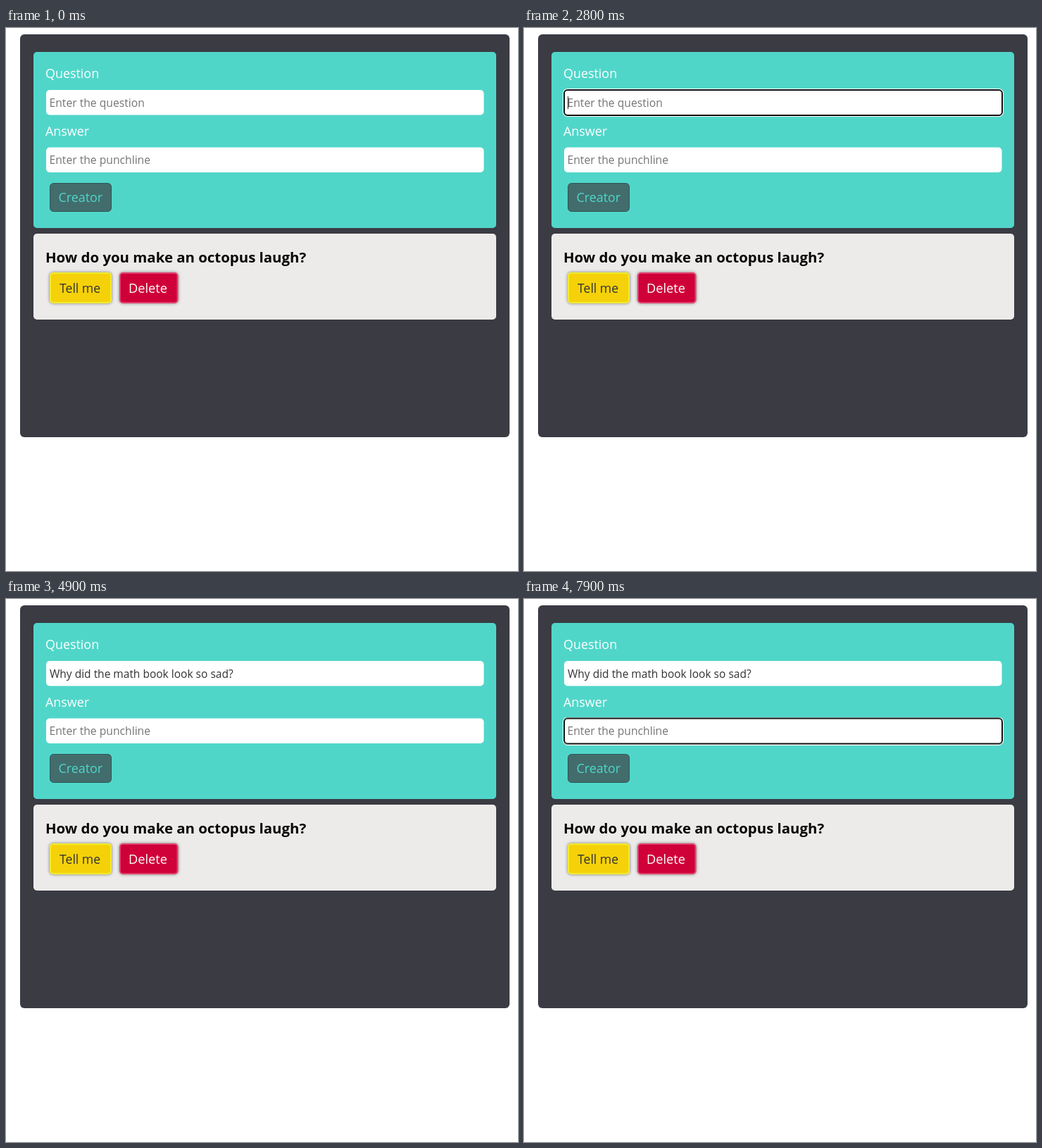
An HTML page for the animation above (8 s loop, 727 by 771 pixels).

```html
<!DOCTYPE html>
<html lang="en">
<head>
<meta charset="utf-8">
<title>Joke form</title>
<style>
  html, body { margin: 0; width: 100%; height: 100%; overflow: hidden; background: #fff; }
  svg { display: block; width: 727px; height: 771px; }
  text { font-family: "Open Sans", "Noto Sans", sans-serif; font-size: 17.9px; fill: #fff; }
  .hint { font-size: 15.7px; fill: #757575; }
  .typed { font-size: 15.5px; fill: #333; }
  .title { font-size: 20.4px; font-weight: 700; fill: #060606; }
  .caret { fill: #222; }
  .raised { filter: drop-shadow(0 0 2px rgba(40, 40, 30, .6)); }

  /* Every state is a hard switch on one 8 s clock. */
  .focus-q, .focus-a, .empty-q, .full-q, .caret-start, .caret-end, .caret-a {
    animation: 8s step-end infinite;
  }
  .focus-q { animation-name: focus-q; }
  .focus-a { animation-name: focus-a; }
  .empty-q { animation-name: empty-q; }
  .full-q { animation-name: full-q; }
  .caret-start { animation-name: caret-start; }
  .caret-end { animation-name: caret-end; }
  .caret-a { animation-name: caret-a; }

  @keyframes focus-q { 0%, 57.5% { opacity: 0 } 33.75% { opacity: 1 } }
  @keyframes focus-a { 0% { opacity: 0 } 88.75%, 100% { opacity: 1 } }
  @keyframes empty-q { 0% { opacity: 1 } 45%, 100% { opacity: 0 } }
  @keyframes full-q { 0% { opacity: 0 } 45%, 100% { opacity: 1 } }
  @keyframes caret-start { 0%, 40%, 100% { opacity: 0 } 33.75% { opacity: 1 } }
  @keyframes caret-end { 0%, 57.5%, 100% { opacity: 0 } 52.5% { opacity: 1 } }
  @keyframes caret-a { 0%, 93.75%, 100% { opacity: 0 } 88.75% { opacity: 1 } }
</style>
</head>
<body>
<svg viewBox="0 0 727 771">
  <defs>
    <g id="ring">
      <rect x="55" y="86" width="626" height="40" rx="7" fill="#fff"/>
      <rect x="57" y="88" width="622" height="36" rx="5" fill="#fff" stroke="#101010" stroke-width="2"/>
    </g>
  </defs>

  <rect x="20" y="9" width="695" height="572" rx="6" fill="#3a3b43"/>

  <!-- Form -->
  <rect x="39" y="34" width="657" height="250" rx="5" fill="#50d6c9"/>
  <text x="56" y="71">Question</text>
  <text x="56" y="152.5">Answer</text>

  <rect x="57" y="88" width="621.5" height="35.5" rx="5" fill="#fff"/>
  <use href="#ring" class="focus-q"/>
  <text class="hint empty-q" x="61.5" y="111.5">Enter the question</text>
  <text class="typed full-q" x="62" y="111.5">Why did the math book look so sad?</text>
  <rect class="caret caret-start" x="62" y="97" width="1" height="18"/>
  <rect class="caret caret-end" x="321.5" y="97" width="1" height="18"/>

  <rect x="57" y="169.5" width="621.5" height="35.5" rx="5" fill="#fff"/>
  <use href="#ring" class="focus-a" y="81.5"/>
  <text class="hint" x="61.5" y="192.5">Enter the punchline</text>
  <rect class="caret caret-a" x="62" y="178" width="1" height="18"/>

  <rect x="62.5" y="220.5" width="87" height="40" rx="5" fill="#426d6c" stroke="#2f5558"/>
  <text x="74.5" y="247" style="fill:#50d6c9">Creator</text>

  <!-- Joke card -->
  <rect x="39" y="292" width="657" height="122" rx="5" fill="#edebe9"/>
  <text class="title" x="56" y="333">How do you make an octopus laugh?</text>

  <rect class="raised" x="63" y="348" width="86" height="42" rx="4" fill="#f5d10a" stroke="#f0ec30" stroke-width="2"/>
  <text x="76" y="375.5" style="fill:#333;font-size:17.6px">Tell me</text>

  <rect class="raised" x="162" y="348" width="81.5" height="42" rx="4" fill="#cf0038" stroke="#e4406e" stroke-width="2"/>
  <text x="174" y="375.5" style="font-size:18.2px">Delete</text>
</svg>
</body>
</html>
```
